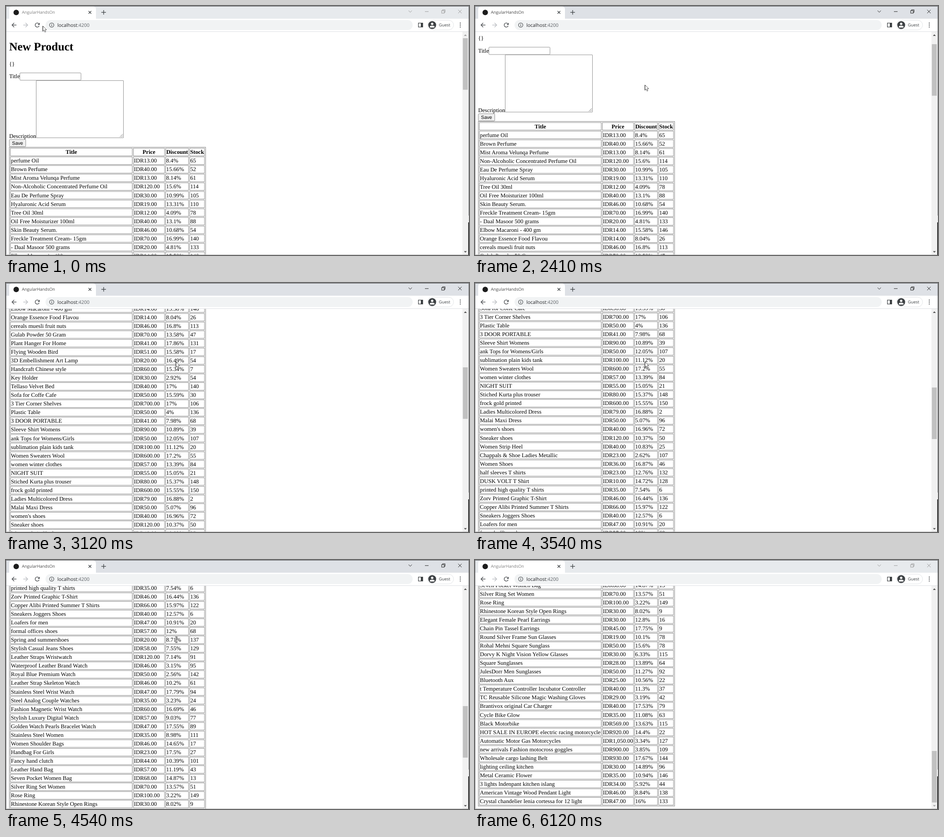
Recreate the animation shown at these times as an HTML page with a canvas. Size 1019x549 px, loop 6280 ms.

```html
<!DOCTYPE html>
<html lang="en">
<head>
<meta charset="utf-8">
<title>AngularHandsOn</title>
<style>
html, body { margin: 0; width: 100%; height: 100%; overflow: hidden; background: #fff; }
canvas { display: block; }
</style>
</head>
<body>
<canvas id="stage" width="1019" height="549"></canvas>
<script>
const ctx = document.getElementById('stage').getContext('2d');
const LOOP = 6280, W = 1019, H = 549, TOP = 57, BOTTOM = 548;
const PITCH = 19.06, CELL = 17.5, HEAD_Y = 322, GAP = 1.6;
const SERIF = '"Liberation Serif", "Times New Roman", serif';
const SANS = '"Open Sans", "Noto Sans", sans-serif';
const ARIAL = '"Liberation Sans", Arial, sans-serif';

// title | price | discount | stock
const products = `perfume Oil|13|8.4|65
Brown Perfume|40|15.66|52
Mist Aroma Velunqa Perfume|13|8.14|61
Non-Alcoholic Concentrated Perfume Oil|120|15.6|114
Eau De Perfume Spray|30|10.99|105
Hyaluronic Acid Serum|19|13.31|110
Tree Oil 30ml|12|4.09|78
Oil Free Moisturizer 100ml|40|13.1|88
Skin Beauty Serum.|46|10.68|54
Freckle Treatment Cream- 15gm|70|16.99|140
- Daal Masoor 500 grams|20|4.81|133
Elbow Macaroni - 400 gm|14|15.58|146
Orange Essence Food Flavou|14|8.04|26
cereals muesli fruit nuts|46|16.8|113
Gulab Powder 50 Gram|70|13.58|47
Plant Hanger For Home|41|17.86|131
Flying Wooden Bird|51|15.58|17
3D Embellishment Art Lamp|20|16.49|54
Handcraft Chinese style|60|15.34|7
Key Holder|30|2.92|54
Tellaso Velvet Bed|40|17|140
Sofa for Coffe Cafe|50|15.59|30
3 Tier Corner Shelves|700|17|106
Plastic Table|50|4|136
3 DOOR PORTABLE|41|7.98|68
Sleeve Shirt Womens|90|10.89|39
ank Tops for Womens/Girls|50|12.05|107
sublimation plain kids tank|100|11.12|20
Women Sweaters Wool|600|17.2|55
women winter clothes|57|13.39|84
NIGHT SUIT|55|15.05|21
Stiched Kurta plus trouser|80|15.37|148
frock gold printed|600|15.55|150
Ladies Multicolored Dress|79|16.88|2
Malai Maxi Dress|50|5.07|96
women's shoes|40|16.96|72
Sneaker shoes|120|10.37|50
Women Strip Heel|40|10.83|25
Chappals & Shoe Ladies Metallic|23|2.62|107
Women Shoes|36|16.87|46
half sleeves T shirts|23|12.76|132
DUSK VOLT T Shirt|10|14.72|128
printed high quality T shirts|35|7.54|6
Zorv Printed Graphic T-Shirt|46|16.44|136
Copper Alibi Printed Summer T Shirts|66|15.97|122
Sneakers Joggers Shoes|40|12.57|6
Loafers for men|47|10.91|20
formal offices shoes|57|12|68
Spring and summershoes|20|8.71|137
Stylish Casual Jeans Shoes|58|7.55|129
Leather Straps Wristwatch|120|7.14|91
Waterproof Leather Brand Watch|46|3.15|95
Royal Blue Premium Watch|50|2.56|142
Leather Strap Skeleton Watch|46|10.2|61
Stainless Steel Wrist Watch|47|17.79|94
Steel Analog Couple Watches|35|3.23|24
Fashion Magnetic Wrist Watch|60|16.69|46
Stylish Luxury Digital Watch|57|9.03|77
Golden Watch Pearls Bracelet Watch|47|17.55|89
Stainless Steel Women|35|8.98|111
Women Shoulder Bags|46|14.65|17
Handbag For Girls|23|17.5|27
Fancy hand clutch|44|10.39|101
Leather Hand Bag|57|11.19|43
Seven Pocket Women Bag|68|14.87|13
Silver Ring Set Women|70|13.57|51
Rose Ring|100|3.22|149
Rhinestone Korean Style Open Rings|30|8.02|9
Elegant Female Pearl Earrings|30|12.8|16
Chain Pin Tassel Earrings|45|17.75|9
Round Silver Frame Sun Glasses|19|10.1|78
Rohal Mehni Square Sunglass|50|15.6|78
Dorvy K Night Vision Yellow Glasses|30|6.33|115
Square Sunglasses|28|13.89|64
JulesDorr Men Sunglasses|50|11.27|92
Bluetooth Aux|25|10.56|22
t Temperature Controller Incubator Controller|40|11.3|37
TC Reusable Silicone Magic Washing Gloves|29|3.19|42
Brantivox original Car Charger|40|17.53|79
Cycle Bike Glow|35|11.08|63
Black Motorbike|569|13.63|115
HOT SALE IN EUROPE electric racing motorcycle|920|14.4|22
Automatic Motor Gas Motorcycles|1,050|3.34|127
new arrivals Fashion motocross goggles|900|3.85|109
Wholesale cargo lashing Belt|930|17.67|144
lighting ceiling kitchen|30|14.89|96
Metal Ceramic Flower|35|10.94|146
3 lights lndenpant kitchen islang|34|5.92|44
American Vintage Wood Pendant Light|46|8.84|138
Crystal chandelier lenia cortessa for 12 light|47|16|133`
  .split('\n').map(line => {
    const [title, price, off, stock] = line.split('|');
    return [title, `IDR${price}.00`, off + '%', stock];
  });
const headings = ['Title', 'Price', 'Discount', 'Stock'];
const fullCols = [269.1, 69.5, 51.2, 33.5];
const emptyCols = [28.6, 31.4, 51.2, 33.5];

// [time, value...]: each value holds until the next time
const scrollKeys = [[0, 0], [2410, 56.7], [2540, 122], [2690, 200], [2820, 295], [2970, 397],
  [3120, 494.3], [3250, 562], [3380, 632], [3540, 685.9], [3690, 713], [3810, 752], [3960, 794],
  [4260, 798.8], [4400, 920], [4540, 1080], [4690, 1191], [4970, 1295.8], [5100, 1503.5], [5260, 1505.5]];
const pointerKeys = [[0, 81, 44], [140, 75, 42], [270, 70, 40], [700, 230, 112], [830, 374, 174],
  [5260, 391, 232], [5400, 420, 339], [5550, 443, 430], [5680, 440, 502], [5830, 440, 570]];
const focusKeys = [[0, 0], [140, 0.5], [270, 1], [5990, 0.5], [6120, 0]];
const bubbleKeys = [[0, 0], [420, 0.5], [540, 1], [1140, 0.5], [1260, 0]];

const hold = (keys, t) => keys.reduce((cur, key) => key[0] <= t ? key : cur).slice(1);

function text(str, x, y, font, color = '#000', align = 'left') {
  ctx.font = font;
  ctx.fillStyle = color;
  ctx.textAlign = align;
  ctx.fillText(str, x, y);
}
function rect(x, y, w, h, color) {
  ctx.fillStyle = color;
  ctx.fillRect(x, y, w, h);
}
function round(x, y, w, h, r, fill, stroke, width = 0.8) {
  ctx.beginPath();
  ctx.roundRect(x, y, w, h, r);
  if (fill) { ctx.fillStyle = fill; ctx.fill(); }
  if (stroke) { ctx.strokeStyle = stroke; ctx.lineWidth = width; ctx.stroke(); }
}
function line(points, color, width = 1) {
  ctx.beginPath();
  points.forEach(([x, y]) => ctx.lineTo(x, y));
  ctx.strokeStyle = color;
  ctx.lineWidth = width;
  ctx.stroke();
}
function shape(points, fill) {
  ctx.beginPath();
  points.forEach(([x, y]) => ctx.lineTo(x, y));
  ctx.closePath();
  ctx.fillStyle = fill;
  ctx.fill();
}
function disc(x, y, r, color) {
  ctx.beginPath();
  ctx.arc(x, y, r, 0, 7);
  ctx.fillStyle = color;
  ctx.fill();
}
function arc(x, y, r, from, to, color, width) {
  ctx.beginPath();
  ctx.arc(x, y, r, from, to);
  ctx.strokeStyle = color;
  ctx.lineWidth = width;
  ctx.stroke();
}
function cross(x, y, r, color, width) {
  line([[x - r, y - r], [x + r, y + r]], color, width);
  line([[x + r, y - r], [x - r, y + r]], color, width);
}
function box(x, y, w, h, color = '#6c6c6c') {
  ctx.strokeStyle = color;
  ctx.lineWidth = 0.8;
  ctx.strokeRect(x + 0.4, y + 0.4, w - 0.8, h - 0.8);
}

function drawTable(scroll, loaded) {
  const cols = loaded ? fullCols : emptyCols;
  const rows = loaded ? products : [];
  const width = cols.reduce((a, b) => a + b) + GAP * 6;
  const top = HEAD_Y - CELL / 2 - 2.4 - scroll;
  box(6.8, top, width, rows.length * PITCH + CELL + 4.8);
  [headings, ...rows].forEach((row, i) => {
    const y = HEAD_Y + i * PITCH - scroll;
    if (y < TOP - 15 || y > BOTTOM + 15) return;
    let x = 9.2;
    row.forEach((cell, c) => {
      box(x, y - CELL / 2, cols[c], CELL);
      if (i) text(cell, x + 1.6, y + 4.2, '12.7px ' + SERIF);
      else text(cell, x + cols[c] / 2, y + 4.2, 'bold 12.7px ' + SERIF, '#000', 'center');
      x += cols[c] + GAP;
    });
  });
}

function drawForm() {
  text('New Product', 7, 97.5, 'bold 25.4px ' + SERIF);
  text('{}', 7, 131.8, '12.7px ' + SERIF);
  text('Title', 7, 159.4, '12.7px ' + SERIF);
  round(30.5, 147.5, 134.5, 16.2, 1.5, '#fff', '#767676');
  text('Description', 7, 290.6, '12.7px ' + SERIF);
  round(66.5, 164.4, 192, 126.2, 0.5, '#fff', '#767676');
  line([[250.5, 289], [257, 282.5]], '#555', 0.8);
  line([[254, 289], [257, 286]], '#555', 0.8);
  round(7.3, 294.2, 36.2, 16, 2, '#efefef', '#767676');
  text('Save', 25.4, 305.9, '10.6px ' + ARIAL, '#000', 'center');
}

function drawScrollbar(scroll) {
  rect(1004.5, TOP, 13, BOTTOM - TOP, '#f1f1f1');
  rect(1005.5, 71 + scroll * 0.2325, 10.8, 113.6, '#c1c1c1');
  shape([[1007.8, 66], [1011, 62.6], [1014.2, 66]], scroll > 0 ? '#505050' : '#a3a3a3');
  shape([[1007.8, 540.4], [1011, 543.8], [1014.2, 540.4]], scroll > 1505 ? '#a3a3a3' : '#505050');
}

function drawBubble(alpha) {
  ctx.globalAlpha = alpha;
  round(0, 532, 338.5, 18, [0, 4, 0, 0], '#fff', '#c8cbcf');
  text('Waiting for localhost...', 6, 543.8, '9.1px ' + SANS, '#5f6368');
  ctx.globalAlpha = 1;
}

function drawTabs(t, focus, loading) {
  const blend = (from, to) => Math.round(from + (to - from) * focus);
  const grey = (from, to) => {
    const v = blend(from, to);
    return `rgb(${v},${v},${v})`;
  };
  rect(0, 0, W, 29, `rgb(${blend(231, 222)},${blend(234, 225)},${blend(237, 230)})`);
  round(7, 1, 191, 32, [6, 6, 0, 0], '#fff');
  if (loading) arc(22.5, 14.2, 5.3, t / 130, t / 130 + 4, '#1a73e8', 1.5);
  else disc(22.5, 14.2, 6, '#1c1c1c');
  text('AngularHandsOn', 35, 17.4, '9.1px ' + SANS, grey(125, 70));
  cross(184.7, 14, 3, '#3c4043', 1.2);
  line([[209.8, 14], [220, 14]], '#3c4043', 1.3);
  line([[214.9, 9], [214.9, 19]], '#3c4043', 1.3);

  const ink = grey(155, 35);
  line([[886, 10.2], [889.7, 13.8], [893.4, 10.2]], ink, 1);
  line([[922, 12.3], [930, 12.3]], ink, 1);
  ctx.strokeStyle = ink;
  ctx.strokeRect(958.9, 10.2, 5.6, 5.6);
  line([[960.7, 10], [960.7, 8.3], [966.4, 8.3], [966.4, 14], [964.8, 14]], ink, 1);
  cross(999, 12.2, 3.8, ink, 1);
}

function drawToolbar(loading) {
  const ink = '#46494d';
  rect(0, 28, W, 29, '#fff');
  rect(0, 56, W, 0.9, '#dadce0');
  [[1, 18, ink], [-1, 43, '#b9bcc0']].forEach(([dir, x, color]) => {
    line([[x - 4.8 * dir, 42], [x + 5 * dir, 42]], color, 1.3);
    line([[x, 37.2], [x - 4.8 * dir, 42], [x, 46.8]], color, 1.3);
  });
  if (loading) cross(69, 42, 4, ink, 1.4);
  else {
    arc(68.8, 42, 4.5, 0.4, 5.4, ink, 1.4);
    shape([[74.2, 36.8], [74.2, 41.4], [69.6, 41.4]], ink);
  }
  round(87, 31, 808, 22, 11, '#f1f3f4');
  arc(100.6, 42, 4.8, 0, 7, ink, 1.1);
  rect(100, 41.2, 1.2, 3.5, ink);
  rect(100, 39, 1.2, 1.3, ink);
  text('localhost', 113, 45.8, '10.5px ' + SANS, '#202124');
  const hostWidth = ctx.measureText('localhost').width;
  text(':4200', 113 + hostWidth, 45.8, '10.5px ' + SANS, '#5f6368');

  ctx.strokeStyle = '#3c4043';
  ctx.lineWidth = 1.2;
  ctx.strokeRect(907.6, 37.6, 9.6, 8.8);
  rect(913, 37.6, 4.2, 8.8, '#3c4043');
  round(927.5, 31.3, 57.5, 21.4, 10.7, '#fff', '#dadce0');
  disc(938, 42, 8.7, '#3c4043');
  disc(938, 39.3, 2.6, '#fff');
  round(932.8, 43.4, 10.4, 4, [4, 4, 1, 1], '#fff');
  text('Guest', 952.8, 45.3, '9.1px ' + SANS, '#3c4043');
  [37.7, 42, 46.3].forEach(y => disc(999.8, y, 1.15, ink));
}

function drawFrame() {
  rect(0, 0, W, 1, '#55575a');
  rect(0, 0, 0.8, H, '#77797c');
  rect(1018, 0, 1, 462, '#77797c');
  rect(1018, 462, 1, 15, '#d0d0d0');
  rect(1017.5, 477, 1.5, H - 477, '#000');
  rect(0, 548, 1017.5, 1, '#b8b8b8');
}

function drawPointer(x, y, beam) {
  if (beam) {
    line([[375, 170], [375, 181.5]], '#222', 1);
    [169.6, 182].forEach(cy => line([[372.4, cy], [377.6, cy]], '#222', 1));
    return;
  }
  const outline = [[0, 0], [0, 11.6], [2.7, 9.3], [4.6, 13.6], [6.5, 12.8], [4.7, 8.6], [8.4, 8.3]]
    .map(([px, py]) => [x + px, y + py]);
  shape(outline, '#fff');
  line([...outline, outline[0], outline[1]], '#2a2a2a', 0.8);
}

function draw(t) {
  const [scroll] = hold(scrollKeys, t);
  const [focus] = hold(focusKeys, t);
  const [bubble] = hold(bubbleKeys, t);
  const [px, py] = hold(pointerKeys, t);
  const loading = t >= 420 && t < 1140;
  const loaded = t < 980 || t >= 1980;

  rect(0, 0, W, H, '#fff');
  ctx.save();
  ctx.beginPath();
  ctx.rect(0, TOP, W, BOTTOM - TOP);
  ctx.clip();
  ctx.save();
  ctx.translate(0, -scroll);
  if (scroll < 260) drawForm();
  ctx.restore();
  drawTable(scroll, loaded);
  if (loaded) drawScrollbar(scroll);
  if (bubble) drawBubble(bubble);
  ctx.restore();

  drawTabs(t, focus, loading);
  drawToolbar(loading);
  drawFrame();
  drawPointer(px, py, t >= 3960 && t < 5260);
}

ctx.textRendering = 'geometricPrecision';
const start = performance.now();
function tick() {
  draw((performance.now() - start) % LOOP);
  requestAnimationFrame(tick);
}
tick();
</script>
</body>
</html>
```
